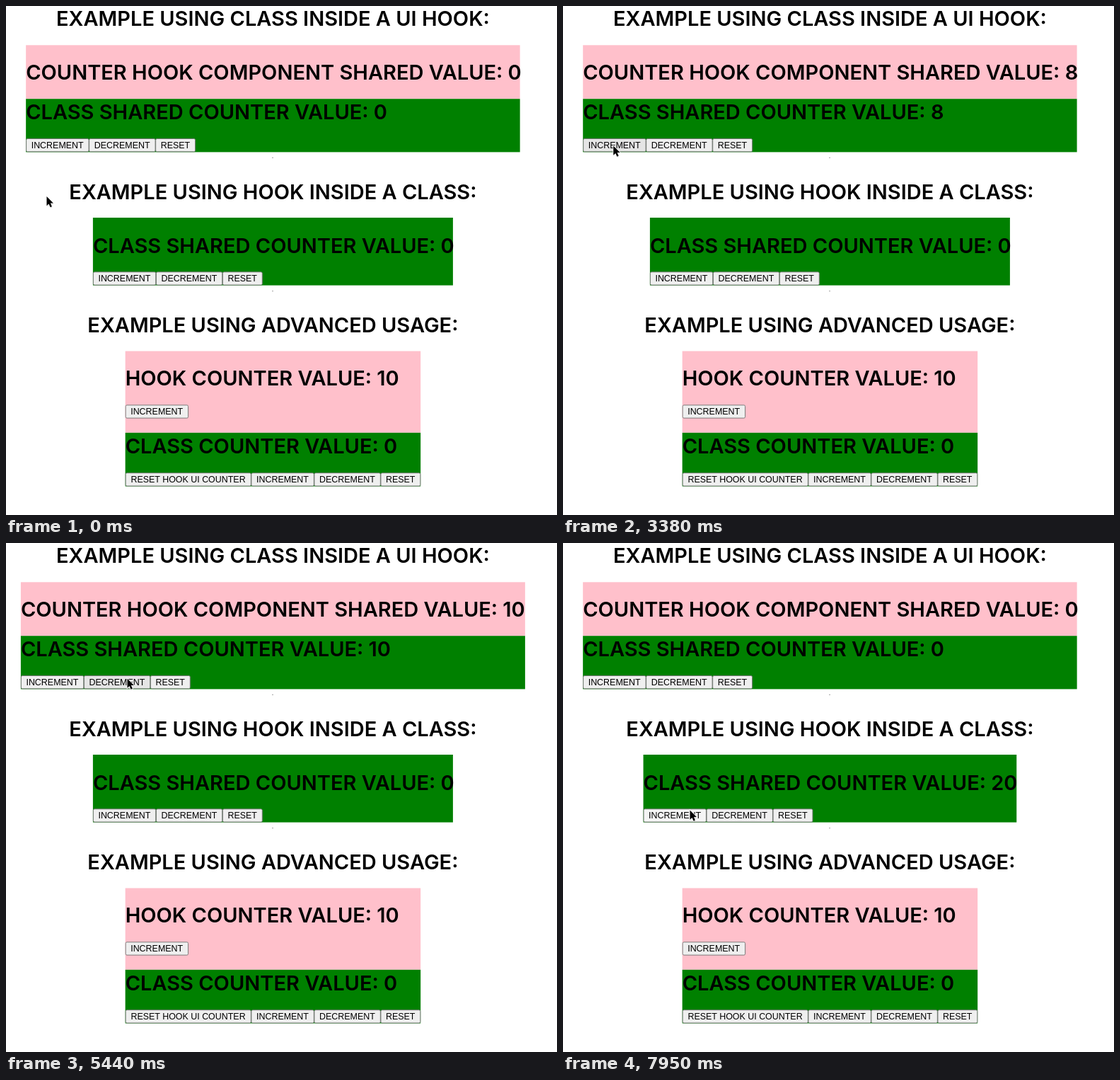
Write an HTML page that moves like this. It is 779 px wide and 719 px high and loops after 8000 ms.

```html
<!DOCTYPE html>
<html lang="en">
<head>
<meta charset="utf-8">
<title>Shared counters</title>
<style>
  html, body { margin: 0; width: 100%; height: 100%; overflow: hidden; background: #fff; }
  svg { display: block; width: 779px; height: 719px; }
  .heading { font: 600 29px Inter, "Open Sans", sans-serif; font-optical-sizing: none; }
  .label { font: 12.45px "Liberation Sans", Arial, sans-serif; text-anchor: middle; }
  .title { text-anchor: middle; }
</style>
</head>
<body>
<svg id="stage" viewBox="0 0 779 719"></svg>
<script>
const LOOP = 8000, TICK = 147.2, CENTER = 377.4;
const stage = document.getElementById('stage');
const DIGITS = [19.5, 14.5, 18.7, 18.9, 19.2, 18.5, 19.3, 17.3, 19.4, 19.3];
const BUTTONS = { 'INCREMENT': 89, 'DECREMENT': 94, 'RESET': 56.5, 'RESET HOOK UI COUNTER': 177.8 };
const buttons = [];

function add(parent, tag, attrs, text) {
  const el = document.createElementNS('http://www.w3.org/2000/svg', tag);
  for (const key in attrs) el.setAttribute(key, attrs[key]);
  if (text) el.textContent = text;
  parent.appendChild(el);
  return el;
}

const heading = (parent, y, text) => add(parent, 'text', { class: 'heading', x: 0, y }, text);
const title = (y, text) => add(stage, 'text', { class: 'heading title', x: CENTER, y }, text);
const dot = y => add(stage, 'rect', { x: 376.2, y, width: 1.6, height: 1, fill: '#888' });

function buttonRow(box, y, names) {
  let x = 0;
  for (const name of names) {
    const width = BUTTONS[name];
    const face = add(box.el, 'rect', {
      x: x + 0.5, y: y + 0.5, width: width - 0.6, height: 18.3, rx: 1.8,
      fill: '#efefef', stroke: '#767676', 'stroke-width': 0.95
    });
    add(box.el, 'text', { class: 'label', x: x + width / 2, y: y + 13.9 }, name);
    buttons.push({ face, box, x, y, width });
    x += width;
  }
}

function makeBox(base, bands) {
  const box = { el: add(stage, 'g', {}), base, left: 0 };
  box.bands = bands.map(([y, bottom, fill]) =>
    add(box.el, 'rect', { y, height: bottom - y, fill }));
  return box;
}

function resize(box, width) {
  box.left = CENTER - width / 2;
  box.el.setAttribute('transform', `translate(${box.left.toFixed(2)} 0)`);
  box.bands.forEach(band => band.setAttribute('width', width));
}

function showValue(box, value) {
  const digits = [...String(value)];
  resize(box, box.base + digits.reduce((sum, d) => sum + DIGITS[d], 0));
  for (const [el, text] of box.values) el.textContent = text + value;
}

const trio = ['INCREMENT', 'DECREMENT', 'RESET'];

title(28, 'EXAMPLE USING CLASS INSIDE A UI HOOK:');
const shared = makeBox(679, [[55.3, 131.2, 'pink'], [131.2, 206.4, 'green']]);
shared.values = [
  [heading(shared.el, 104), 'COUNTER HOOK COMPONENT SHARED VALUE: '],
  [heading(shared.el, 160), 'CLASS SHARED COUNTER VALUE: ']
];
buttonRow(shared, 187, trio);
dot(213.8);

title(273, 'EXAMPLE USING HOOK INSIDE A CLASS:');
const classBox = makeBox(489.5, [[299, 394.6, 'green']]);
classBox.values = [[heading(classBox.el, 349), 'CLASS SHARED COUNTER VALUE: ']];
buttonRow(classBox, 375.3, trio);
dot(402.2);

title(460.5, 'EXAMPLE USING ADVANCED USAGE:');
const advanced = makeBox(0, [[487.5, 602.8, 'pink'], [602.8, 678.5, 'green']]);
resize(advanced, 417.5);
heading(advanced.el, 536, 'HOOK COUNTER VALUE: 10');
heading(advanced.el, 632, 'CLASS COUNTER VALUE: 0');
buttonRow(advanced, 563.3, ['INCREMENT']);
buttonRow(advanced, 659.2, ['RESET HOOK UI COUNTER', ...trio]);

const cursor = add(stage, 'g', {});
const arrow = 'M0 0V13.2L3 10.4L5.1 15.3L7.4 14.3L5.4 9.6H9.4Z';
add(cursor, 'path', { d: arrow, fill: '#000', opacity: 0.2, transform: 'translate(.4 1.2)' });
add(cursor, 'path', { d: arrow, fill: '#000', stroke: '#fff', 'stroke-width': 1.5, 'paint-order': 'stroke' });

// Each entry starts with the tick it applies from.
const sharedSteps = [[0, 0], [11, 1], [12, 2], [14, 3], [15, 4], [16, 5], [17, 6], [19, 7],
  [20, 8], [28, 9], [31, 10], [38, 9], [39, 8], [42, 0]];
const classSteps = [[0, 0], [52, 10], [54, 20]];
const path = [[3, 57.5, 269], [9, 85.5, 198.5], [20, 85.5, 198.5], [26, 57, 196.5],
  [30, 57, 196.5], [36, 171.5, 191.5], [39, 171.5, 191.5], [41, 233, 193],
  [43, 233, 193], [50, 181.5, 376], [51, 179.5, 377.5], [54, 179.5, 377.5]];
const presses = [10, 27, 50, 54];

const valueAt = (steps, tick) => steps.filter(([start]) => start <= tick).pop()[1];

function cursorAt(tick) {
  const i = path.findIndex(([at]) => at >= tick);
  if (i <= 0) return path[i ? path.length - 1 : 0].slice(1);
  const [t0, x0, y0] = path[i - 1], [t1, x1, y1] = path[i];
  const k = (tick - t0) / (t1 - t0), ease = k * k * (3 - 2 * k);
  return [x0 + (x1 - x0) * ease, y0 + (y1 - y0) * ease];
}

function draw(time) {
  const tick = Math.floor((time % LOOP + 5) / TICK);
  showValue(shared, valueAt(sharedSteps, tick));
  showValue(classBox, valueAt(classSteps, tick));
  const [x, y] = cursorAt(tick);
  cursor.setAttribute('transform', `translate(${x.toFixed(2)} ${y.toFixed(2)})`);
  const hover = presses.includes(tick) ? '#f5f5f5' : '#e5e5e5';
  for (const b of buttons) {
    const dx = x - b.box.left - b.x, dy = y - b.y;
    const over = dx >= 0 && dx < b.width && dy >= 0 && dy < 19.2;
    b.face.setAttribute('fill', over ? hover : '#efefef');
  }
}

const start = performance.now();
function frame() {
  draw(performance.now() - start);
  requestAnimationFrame(frame);
}
draw(0);
requestAnimationFrame(frame);
</script>
</body>
</html>
```
